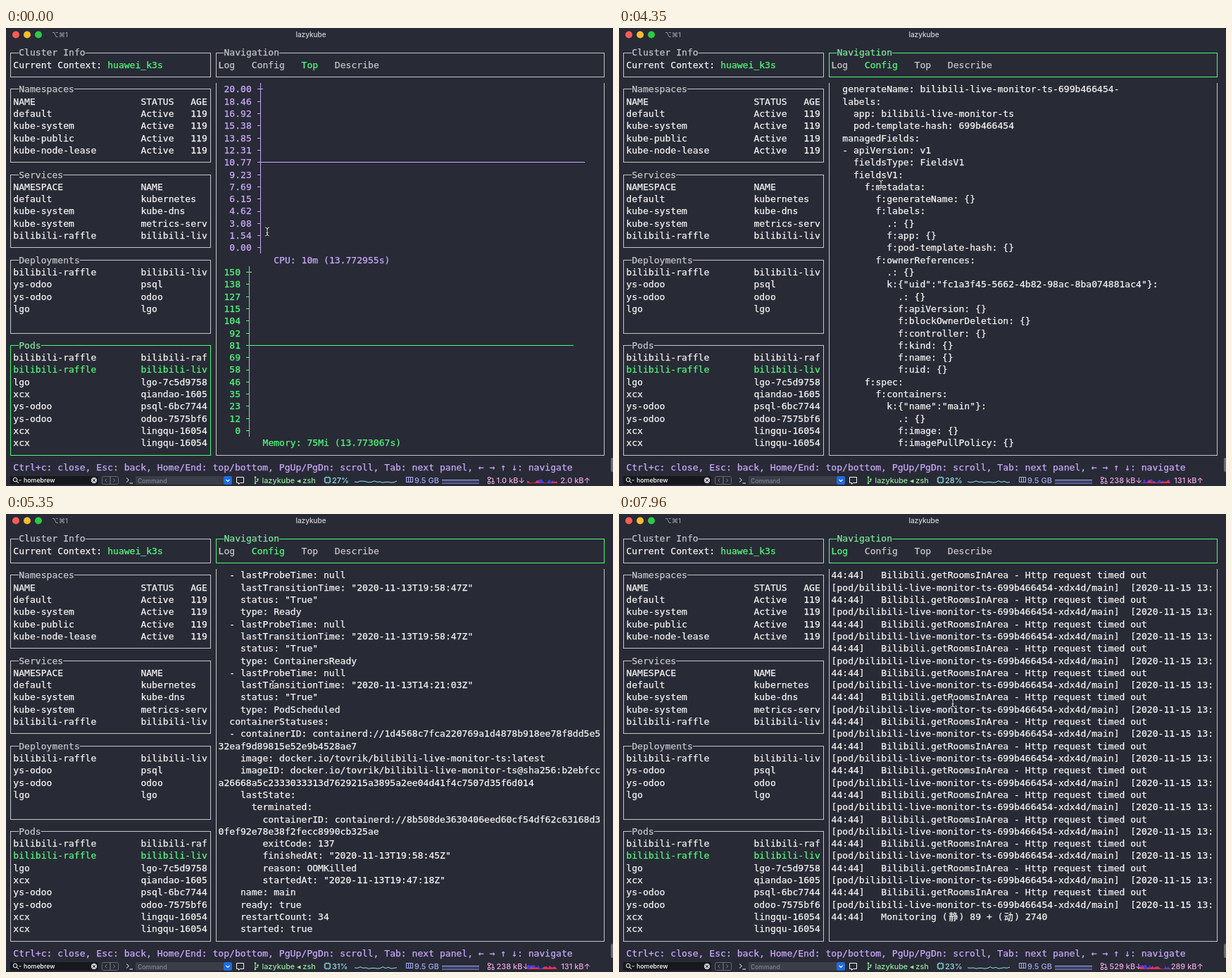
Recreate the animation shown at these times as an HTML page. Size 862 by 650 pixels, loop 7990 ms.

```html
<!DOCTYPE html>
<html lang="en">
<head>
<meta charset="utf-8">
<title>lazykube</title>
<style>
html, body { margin: 0; width: 100%; height: 100%; overflow: hidden; background: #282a36; }
svg { display: block; width: 862px; height: 650px; }
text { white-space: pre; }
.mono { font: 13.07px "DejaVu Sans Mono", "Noto Sans CJK SC", monospace; stroke-width: .25px; }
.ui { font: 500 11px Inter, sans-serif; }
</style>
</head>
<body>
<svg id="stage" viewBox="0 0 862 650"></svg>
<script>
const LOOP = 7990, CELL = 7.87, ROW = 17.31, X0 = 2.5, Y0 = 35;
const WHITE = '#f4f4f0', GREY = '#c6c6c8', GREEN = '#50fa7b', PURPLE = '#caa9fa';
const CYAN = '#8fe3e3', BLUE = '#9fa8ea', PINK = '#eba6dc';
const stage = document.getElementById('stage');

function add(tag, attrs, parent = stage) {
  const el = document.createElementNS('http://www.w3.org/2000/svg', tag);
  for (const k in attrs) el.setAttribute(k, attrs[k]);
  return parent.appendChild(el);
}
const colX = c => X0 + c * CELL;
const midX = c => Math.round(colX(c + .5));
const rowY = r => Math.round(Y0 + r * ROW - .5);
const rect = (x, y, width, height, fill, parent, rx = 0) => add('rect', { x, y, width, height, fill, rx }, parent);
const stroke = (d, color, width = 1, parent) => add('path', { d, fill: 'none', stroke: color, 'stroke-width': width }, parent);

// Text on the terminal grid; wide characters take two cells.
function put(col, row, str, color = WHITE, parent) {
  const el = add('text', { class: 'mono', y: Math.round(Y0 + row * ROW + 4.4), fill: color, stroke: color }, parent);
  let at = col;
  for (const part of str.match(/[\u4e00-\u9fff]|[^\u4e00-\u9fff]+/g) || []) {
    const wide = part > '\u4dff' && part < '\ua000';
    add('tspan', { x: colX(at) + (wide ? 1.3 : 0) }, el).textContent = part;
    at += wide ? 2 : part.length;
  }
  return el;
}
function ui(x, str, color, size = 11, y = 646, extra = {}) {
  const el = add('text', { class: 'ui', x, y, fill: color, style: `font-size:${size}px`, ...extra });
  el.textContent = str;
  return el;
}
// Bordered box with a title set into its top edge.
function box(c1, c2, r1, r2, title) {
  const g = add('g', {});
  const l = midX(c1), r = midX(c2), t = rowY(r1), b = rowY(r2), end = colX(2 + c1 + title.length);
  rect(l, t, colX(c1 + 2) - l, 1, '', g);
  rect(end, t, r - end, 1, '', g);
  rect(l, b, r - l + 1, 1, '', g);
  rect(l, t, 1, b - t, '', g);
  rect(r, t, 1, b - t, '', g);
  put(c1 + 2, r1, title, GREY, g);
  return color => { for (const el of g.children) { el.setAttribute('fill', color); } };
}

// Title bar
['#ff5b55', '#fdbc2e', '#2bca44'].forEach((fill, i) => add('circle', { cx: 14 + 16 * i, cy: 9.5, r: 5, fill }));
ui(65, '⌥⌘1', '#9c9da4', 9.5, 13, { 'font-family': 'Inter, "DejaVu Sans", sans-serif' });
ui(433, 'lazykube', '#d3d3d7', 10, 12.5, { 'text-anchor': 'middle' });
rect(859, 610, 5, 20, '#6b6d76', stage, 2);

// Left column
const panels = [
  ['Cluster Info', 0, 2, ['Current Context:']],
  ['Namespaces', 3, 9, ['NAME|STATUS|AGE', 'default|Active|119', 'kube-system|Active|119',
    'kube-public|Active|119', 'kube-node-lease|Active|119']],
  ['Services', 10, 16, ['NAMESPACE|NAME', 'default|kubernetes', 'kube-system|kube-dns',
    'kube-system|metrics-serv', 'bilibili-raffle|bilibili-liv']],
  ['Deployments', 17, 23, ['bilibili-raffle|bilibili-liv', 'ys-odoo|psql', 'ys-odoo|odoo', 'lgo|lgo']],
  ['Pods', 24, 33, ['bilibili-raffle|bilibili-raf', 'bilibili-raffle|bilibili-liv', 'lgo|lgo-7c5d9758',
    'xcx|qiandao-1605', 'ys-odoo|psql-6bc7744', 'ys-odoo|odoo-7575bf6', 'xcx|lingqu-16054', 'xcx|lingqu-16054']]
];
let paintPods;
for (const [title, top, bottom, lines] of panels) {
  paintPods = box(0, 36, top, bottom, title);
  paintPods(GREY);
  lines.forEach((line, i) => line.split('|').forEach((s, k) =>
    put([1, 24, 33][k], top + 1 + i, s, title === 'Pods' && i === 1 ? GREEN : WHITE)));
}
put(18, 1, 'huawei_k3s', GREEN);
put(1, 34, 'Ctrl+c: close, Esc: back, Home/End: top/bottom, PgUp/PgDn: scroll, Tab: next panel, ← → ↑ ↓: navigate', PURPLE);

// Right column
const paintNav = box(37, 107, 0, 2, 'Navigation');
const tabs = {};
[['Log', 38], ['Config', 44], ['Top', 53], ['Describe', 59]].forEach(([s, c]) => tabs[s] = put(c, 1, s, GREY));
rect(298, 78, 1, 528, GREY);
rect(849, 78, 1, 528, GREY);
rect(298, 606, 552, 1, GREY);

const views = { Top: add('g', {}), Config: add('g', {}), Log: add('g', {}) };

function chart(top, max, digits, axis, hit, caption, color) {
  const g = views.Top, x = midX(axis), width = digits ? 5 : 3;
  for (let i = 0; i < 14; i++) {
    put(39, top + i, (max * (13 - i) / 13).toFixed(digits).padStart(width), color, g);
    rect(x - 4, rowY(top + i), i ? 4 : 8, 1, color, g);
  }
  rect(x, Math.round(Y0 + (top - .5) * ROW), 1, 242, color, g);
  rect(x - 4, rowY(top + hit), 465, 1, color, g);
  return put(caption, top + 14, ' ', color, g).firstChild;
}
const cpuLabel = chart(3, 20, 2, 45, 6, 48, PURPLE);
const memLabel = chart(18, 150, 0, 43, 6, 46, GREEN);

for (let i = 0; i < 28; i++) {
  put(38, 3 + i, i % 2 ? '[pod/bilibili-live-monitor-ts-699b466454-xdx4d/main]  [2020-11-15 13:'
    : '44:44]   Bilibili.getRoomsInArea - Http request timed out', WHITE, views.Log);
}
put(38, 31, '44:44]   Monitoring (静) 89 + (动) 2740', WHITE, views.Log);

const config = `apiVersion: v1
kind: Pod
metadata:
  creationTimestamp: "2020-11-13T14:21:03Z"
  generateName: bilibili-live-monitor-ts-699b466454-
  labels:
    app: bilibili-live-monitor-ts
    pod-template-hash: 699b466454
  managedFields:
  - apiVersion: v1
    fieldsType: FieldsV1
    fieldsV1:
      f:metadata:
        f:generateName: {}
        f:labels:
          .: {}
          f:app: {}
          f:pod-template-hash: {}
        f:ownerReferences:
          .: {}
          k:{"uid":"fc1a3f45-5662-4b82-98ac-8ba074881ac4"}:
            .: {}
            f:apiVersion: {}
            f:blockOwnerDeletion: {}
            f:controller: {}
            f:kind: {}
            f:name: {}
            f:uid: {}
      f:spec:
        f:containers:
          k:{"name":"main"}:
            .: {}
            f:image: {}
            f:imagePullPolicy: {}
            f:name: {}
            f:resources:
              .: {}
              f:limits:
                .: {}
                f:cpu: {}
                f:memory: {}
              f:requests:
                .: {}
                f:cpu: {}
                f:memory: {}
            f:terminationMessagePath: {}
            f:terminationMessagePolicy: {}
        f:dnsPolicy: {}
        f:enableServiceLinks: {}
        f:restartPolicy: {}
        f:schedulerName: {}
        f:securityContext: {}
        f:terminationGracePeriodSeconds: {}
    manager: k3s
    operation: Update
    time: "2020-11-13T19:58:47Z"
  name: bilibili-live-monitor-ts-699b466454-xdx4d
  namespace: bilibili-raffle
  ownerReferences:
  - apiVersion: apps/v1
    blockOwnerDeletion: true
    controller: true
    kind: ReplicaSet
    name: bilibili-live-monitor-ts-699b466454
    uid: fc1a3f45-5662-4b82-98ac-8ba074881ac4
spec:
  containers:
  - image: docker.io/tovrik/bilibili-live-monitor-ts:latest
    imagePullPolicy: Always
    name: main
    resources:
      limits:
        cpu: 100m
        memory: 100Mi
    terminationMessagePath: /dev/termination-log
    terminationMessagePolicy: File
    volumeMounts:
    - mountPath: /var/run/secrets/kubernetes.io/serviceaccount
      name: default-token-jxphd
      readOnly: true
  dnsPolicy: ClusterFirst
  enableServiceLinks: true
  priority: 0
  restartPolicy: Always
  schedulerName: default-scheduler
  securityContext: {}
  serviceAccount: default
  serviceAccountName: default
  terminationGracePeriodSeconds: 30
  volumes:
  - name: default-token-jxphd
    secret:
      defaultMode: 420
      secretName: default-token-jxphd
status:
  conditions:
${[['14:21:03', 'Initialized'], ['19:58:47', 'Ready'], ['19:58:47', 'ContainersReady'], ['14:21:03', 'PodScheduled']]
  .map(([time, type]) => `  - lastProbeTime: null
    lastTransitionTime: "2020-11-13T${time}Z"
    status: "True"
    type: ${type}`).join('\n')}
  containerStatuses:
  - containerID: containerd://1d4568c7fca220769a1d4878b918ee78f8dd5e5
32eaf9d89815e52e9b4528ae7
    image: docker.io/tovrik/bilibili-live-monitor-ts:latest
    imageID: docker.io/tovrik/bilibili-live-monitor-ts@sha256:b2ebfcc
a26668a5c2333033313d7629215a3895a2ee04d41f4c7507d35f6d014
    lastState:
      terminated:
        containerID: containerd://8b508de3630406eed60cf54df62c63168d3
0fef92e78e38f2fecc8990cb325ae
        exitCode: 137
        finishedAt: "2020-11-13T19:58:45Z"
        reason: OOMKilled
        startedAt: "2020-11-13T19:47:18Z"
    name: main
    ready: true
    restartCount: 34
    started: true
    state:
      running:
        startedAt: "2020-11-13T19:58:47Z"
  hostIP: 121.36.154.138
  phase: Running
  podIP: 10.42.0.205
  podIPs:
  - ip: 10.42.0.205
  qosClass: Guaranteed
  startTime: "2020-11-13T14:21:03Z"`.split('\n');
const configRows = Array.from({ length: 30 }, (_, i) => put(38, 3 + i, ' ', WHITE, views.Config).firstChild);

// Status bar
rect(6, 636, 125, 12, '#17181d', stage, 2);
add('circle', { cx: 13, cy: 641, r: 2.8, fill: 'none', stroke: WHITE });
stroke('M15 643l3 3M18.5 641l1.5 1.5 1.5-1.5', WHITE);
ui(25, 'homebrew', '#ffffff', 8.8, 645);
add('circle', { cx: 125, cy: 642, r: 4.2, fill: '#c9c9cc' });
stroke('M123.3 640.3l3.4 3.4m0-3.4l-3.4 3.4', '#17181d');
add('rect', { x: 136.5, y: 636.5, width: 23, height: 11, rx: 2, fill: 'none', stroke: '#656771' });
stroke('M148 637v10M143 639.5l-2 2.5 2 2.5M152.500 639.500l2 2.500-2 2.500', '#80828b');
stroke('M171 638.500l3.500 3-3.500 3M175.500 646h4.500', WHITE);
rect(184, 636, 125, 12, '#3b3d48', stage, 1);
ui(187, 'Command', '#82848d', 8.5, 645.5);
rect(309, 636, 12, 12, '#1f6be0', stage, 2);
stroke('M312.500 641l2.500 2.500 2.500-2.500', '#ffffff', 1.2);
stroke('M327.500 637.500h10v8h-5l-2 2v-2h-3z', WHITE);
const BRANCH = '#90e896';
stroke('M354 638v7M354 643.500h3.500v-2', BRANCH);
[[354, 637.5], [357.5, 640.5], [354, 646]].forEach(([cx, cy]) => add('circle', { cx, cy, r: 1.3, fill: BRANCH }));
ui(363.5, 'lazykube ◂ zsh', BRANCH, 10.8, 645.5);
stroke('M453 638h7v7h-7zM451.500 640h1.500m-1.500 3h1.500m7-3h1.500m-1.500 3h1.500M455 636.500v1.500m3-1.500v1.500m-3 7v1.500m3-1.500v1.500', CYAN, 1.2);
const cpuText = ui(463, '', CYAN);
const cpuSpark = stroke('', CYAN);
stroke('M568.500 637.500h9v7h-9zM571.500 638v6m3-6v6', BLUE, 1.1);
ui(580, '9.5 GB', BLUE);
rect(619, 642, 53, 4, '#3f4263');
rect(619, 641, 53, 1, BLUE);
rect(619, 646, 53, 1, '#6c74b4');
stroke('M684.500 637.500h3v3h-3zM690 643.500h3v3h-3zM684.500 643.500h3v3h-3zM686 641v2M687.500 639h4v4', PINK);
const downText = ui(696.5, '', PINK);
const upText = ui(830, '', PINK, 11, 646, { 'text-anchor': 'end' });
const upSpark = add('path', { fill: '#3d3df0' });
const downSpark = add('path', { fill: '#ef3045' });

const noise = n => { const v = Math.sin(n * 91.7) * 4375.5; return v - Math.floor(v); };
function peaks(seed, size) {
  let d = 'M740 646';
  for (let x = 0; x < 43; x += 2) {
    const h = noise(Math.floor(x / 6) + seed) > .5 ? size * noise(x + seed) : 0;
    d += `L${740 + x} ${645.4 - h}`;
  }
  return d + 'L783 646Z';
}

// Pointer
const pointer = add('g', {});
const BEAM = 'M-3-6q3 0 3 2.500q0-2.500 3-2.500M0-4V4M-3 6q3 0 3-2.500q0 2.500 3 2.500M-1.500 1.500h3';
stroke(BEAM, '#15161c', 2.4, pointer);
stroke(BEAM, '#e4e4e4', 1, pointer);

// Timelines: [time, ...values]
const path = [[0, 371, 289], [30, 372, 280], [210, 431, 118], [350, 431, 118], [600, 436, 119], [750, 434, 116],
  [1530, 410, 63], [1560, 408, 62], [1740, 377, 57], [1800, 377, 57], [1980, 374, 56], [2610, 373, 57], [3600, 373, 57],
  [3630, 374, 55], [3810, 373, 56], [4020, 369, 140], [4170, 370, 190], [4350, 372, 222], [4670, 374, 232],
  [4820, 376, 238], [5060, 379, 242], [5590, 379, 242], [6190, 316, 55], [7150, 316, 55], [7570, 475, 261],
  [7870, 475, 261], [7960, 474, 268]];
const last = config.length - 29, near = last - 21, pause = Math.round(near * .4);
const scroll = [[4150, 0], [4350, 4], [4410, 4], [4670, pause], [4820, pause], [5060, near], [5120, near], [5590, last]];
const cpu = [[0, '27%'], [960, '31%'], [1950, '26%'], [2970, '23%'], [3950, '28%'], [4950, '31%'], [5950, '32%'],
  [6970, '27%'], [7900, '23%']];
const net = [[0, '1.0', '2.0'], [120, '3.1', '3.1'], [3150, '257', '139'], [4180, '238', '131'],
  [6100, '0.0', '0.0'], [7150, '529', '289']];
const load = [[0, '13.772955', '13.773067'], [500, '14.773402', '14.773514'], [1500, '15.773848', '15.773961']];
const screens = [[0, 'Top'], [3450, 'Config'], [6970, 'Log']];

const current = (table, t) => table.filter(k => k[0] <= t).pop();
function blend(table, t) {
  const i = table.findIndex(k => k[0] > t);
  if (i < 1) return (i ? table[table.length - 1] : table[0]).slice(1);
  const a = table[i - 1], b = table[i], p = (t - a[0]) / (b[0] - a[0]);
  return a.slice(1).map((v, k) => v + (b[k + 1] - v) * p);
}

function draw(t) {
  const view = current(screens, t)[1], focus = view !== 'Top';
  for (const k in views) views[k].setAttribute('display', k === view ? 'inline' : 'none');
  for (const k in tabs) {
    const color = k === view ? GREEN : GREY;
    tabs[k].setAttribute('fill', color);
    tabs[k].setAttribute('stroke', color);
  }
  paintNav(focus ? GREEN : GREY);
  paintPods(focus ? GREY : GREEN);

  const [, cpuTime, memTime] = current(load, t);
  cpuLabel.textContent = `CPU: 10m (${cpuTime}s)`;
  memLabel.textContent = `Memory: 75Mi (${memTime}s)`;
  const top = Math.floor(blend(scroll, t)[0] + 1e-6);
  configRows.forEach((row, i) => row.textContent = config[top + i] || '');

  const [, down, up] = current(net, t);
  cpuText.textContent = current(cpu, t)[1];
  downText.textContent = down + ' kB↓';
  upText.textContent = up + ' kB↑';
  const tick = Math.floor((t + 30) / 1000);
  let wave = 'M495 644';
  for (let x = 4; x <= 60; x += 4) wave += `L${495 + x} ${(642.6 + 2.6 * noise(x / 4 + tick)).toFixed(1)}`;
  cpuSpark.setAttribute('d', wave);
  upSpark.setAttribute('d', peaks(tick + 3, 6));
  downSpark.setAttribute('d', peaks(tick + 40, 4));

  const [x, y] = blend(path, t).map(Math.round);
  pointer.setAttribute('transform', `translate(${x} ${y})`);
}

const start = performance.now();
function frame() {
  draw((performance.now() - start) % LOOP);
  requestAnimationFrame(frame);
}
frame();
</script>
</body>
</html>
```
